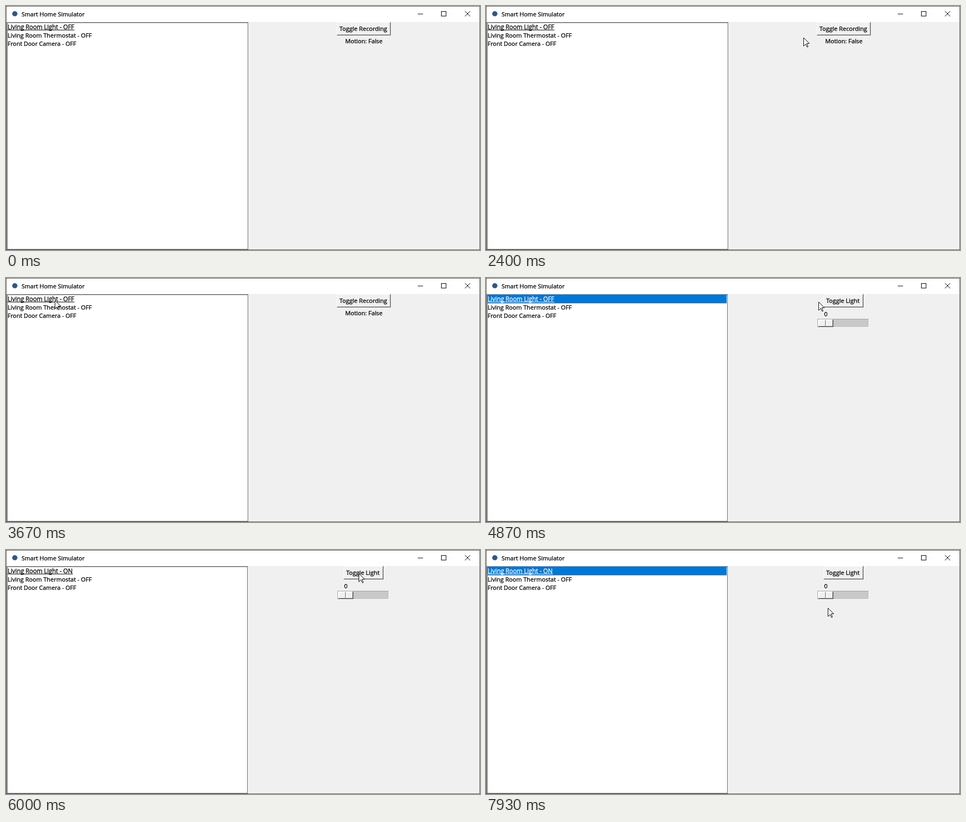
An HTML page with a canvas for the animation above (8 s loop, 914x472 px).

```html
<!DOCTYPE html>
<html lang="en">
<head>
<meta charset="utf-8">
<title>Smart Home Simulator</title>
<style>
html, body { margin: 0; width: 100%; height: 100%; overflow: hidden; background: #fff; }
canvas { display: block; }
</style>
</head>
<body>
<canvas id="stage" width="914" height="472"></canvas>
<script>
const ctx = document.getElementById('stage').getContext('2d', { alpha: false });
const LOOP = 8000, STEP = 1000 / 15;
const FACE = '#f0f0f0', DARK = '#696969', MID = '#a0a0a0';

// Moments, in ms, at which the interface changes
const SHOW = 60, SELECT = 3860, DESELECT = 5060, PRESS = 5195, RELEASE = 5395, RESELECT = 7395;

// Each glide decelerates toward its end point
const glides = [
  { from: 0, to: 335, x: 447, y: 20 },
  { from: 1200, to: 1340, x: 457, y: 49 },
  { from: 1470, to: 1600, x: 308, y: 46 },
  { from: 1779, to: 2100, x: 100, y: 36 },
  { from: 2140, to: 2600, x: 658, y: 63 },
  { from: 2600, to: 3340, x: 115, y: 48 },
  { from: 3540, to: 3665, x: 94, y: 43 },
  { from: 4340, to: 5160, x: 667, y: 46 },
  { from: 5960, to: 6200, x: 698, y: 44 },
  { from: 6610, to: 6860, x: 640, y: 104 },
  { from: 6860, to: 7400, x: 126, y: 42 },
  { from: 7810, to: 7930, x: 659, y: 112 }
];

const easeOut = k => 1 - (1 - k) ** 3;

function pointerAt(t) {
  let x = 425, y = 8;
  for (const g of glides) {
    const k = easeOut(Math.min(1, Math.max(0, (t - g.from) / (g.to - g.from))));
    x += (g.x - x) * k;
    y += (g.y - y) * k;
  }
  return [Math.round(x), Math.round(y)];
}

function rect(x, y, w, h, color) {
  ctx.fillStyle = color;
  ctx.fillRect(x, y, w, h);
}

function text(str, x, y, size = 11.6, color = '#000') {
  ctx.font = `${size}px "Open Sans", "Noto Sans", sans-serif`;
  ctx.fillStyle = ctx.strokeStyle = color;
  ctx.lineWidth = 0.3;
  ctx.fillText(str, x, y);
  ctx.strokeText(str, x, y);
}

// One-pixel frame, lit from the top left, around a filled face
function edge(x, y, w, h, light, shade, face = FACE) {
  rect(x, y, w, h, shade);
  rect(x, y, w - 1, h - 1, light);
  rect(x + 1, y + 1, w - 2, h - 2, face);
}

function button(label, x, w, pressed) {
  edge(x, 31, w, 26, ...(pressed ? [DARK, '#fff'] : ['#fff', DARK]));
  edge(x + 1, 32, w - 2, 24, ...(pressed ? [MID, FACE] : [FACE, MID]));
  text(label, x + 5 + pressed, 48 + pressed);
}

function drawWindow() {
  edge(0, 0, 914, 472, '#5c5c5c', '#5c5c5c');
  rect(1, 1, 912, 30, '#fff');
  ctx.fillStyle = '#34557f';
  ctx.beginPath();
  ctx.arc(17, 15, 5, 0, 7);
  ctx.fill();
  text('Smart Home Simulator', 30, 20, 11.4);
  rect(794, 15, 10, 1, '#000');
  ctx.strokeStyle = '#000';
  ctx.lineWidth = 1;
  ctx.strokeRect(839.5, 10.5, 9, 9);
  ctx.beginPath();
  ctx.moveTo(885, 10); ctx.lineTo(895, 20);
  ctx.moveTo(895, 10); ctx.lineTo(885, 20);
  ctx.stroke();
}

function drawList(right, selected, lightOn) {
  edge(1, 31, right, 440, MID, DARK, DARK);
  rect(3, 33, right - 3, 437, '#fff');
  if (selected) rect(3, 33, 461, 16, '#0078d7');
  const color = selected ? '#fff' : '#000';
  text('Living Room Light - ' + (lightOn ? 'ON' : 'OFF'), 3, 45, 11.8, color);
  rect(3, 46, lightOn ? 126 : 129, 1, color);
  text('Living Room Thermostat - OFF', 3, 61);
  text('Front Door Camera - OFF', 3, 77, 11.4);
}

function drawCameraPanel() {
  button('Toggle Recording', 638, 104, 0);
  text('Motion: False', 654, 72);
}

function drawLightPanel(pressed) {
  button('Toggle Light', 651, 77, pressed);
  text('0', 652, 74);
  edge(639, 79, 100, 17, MID, '#fff', '#c8c8c8');
  edge(640, 80, 30, 15, '#fff', DARK);
  for (const x of [641, 655]) edge(x, 81, 14, 13, '#fff', DARK);
}

const arrow = new Path2D('M.5 .5V16.5L4.5 12.8L7.2 18.5L9 17.8L6.6 11.5H11.5Z');

function drawPointer([x, y]) {
  ctx.save();
  ctx.translate(x, y);
  ctx.fillStyle = '#fff';
  ctx.strokeStyle = '#000';
  ctx.lineWidth = 1;
  ctx.fill(arrow);
  ctx.stroke(arrow);
  ctx.restore();
}

function draw(now) {
  // The screen refreshes fifteen times a second
  const t = Math.floor((now % LOOP) / STEP + 0.06) * STEP;
  const lightPanel = t >= SELECT;
  const selected = (lightPanel && t < DESELECT) || t >= RESELECT;
  drawWindow();
  drawList(lightPanel ? 465 : 466, selected, t >= RELEASE);
  if (lightPanel) drawLightPanel(+(t >= PRESS && t < RELEASE));
  else drawCameraPanel();
  if (t >= SHOW) drawPointer(pointerAt(t));
}

const start = performance.now();
function tick() {
  draw(performance.now() - start);
  requestAnimationFrame(tick);
}
tick();
</script>
</body>
</html>
```
